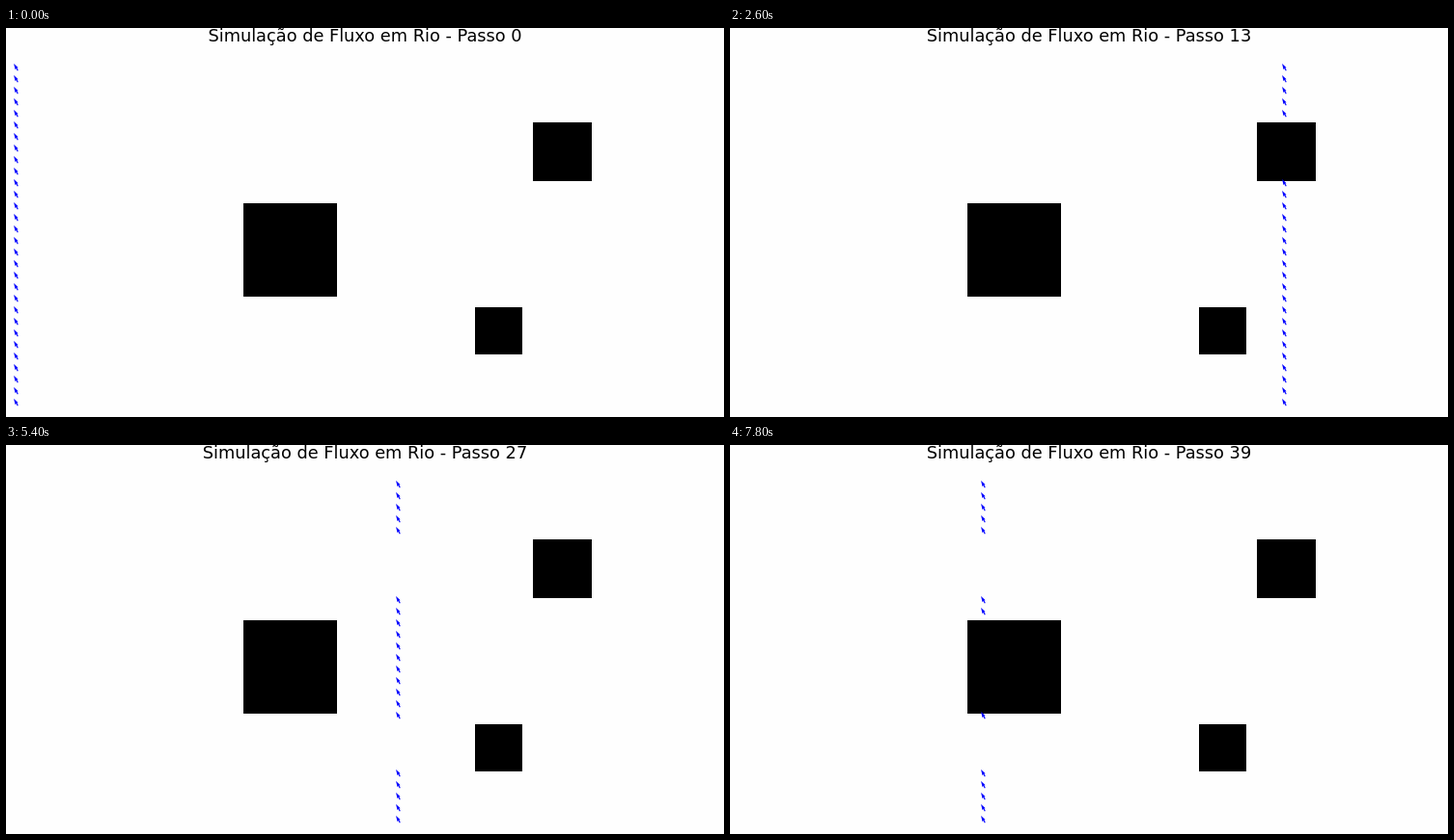
An HTML page with a canvas that plays this animation: 744 by 404 pixels, repeating every 8 s.

```html
<!DOCTYPE html>
<html lang="pt">
<head>
<meta charset="utf-8">
<title>Simulação de Fluxo em Rio</title>
<style>
  html, body { margin: 0; width: 100%; height: 100%; overflow: hidden; background: #fefefe; }
  canvas { display: block; }
</style>
</head>
<body>
<canvas id="stage" width="744" height="404"></canvas>
<script>
const ctx = document.getElementById('stage').getContext('2d');
const STEP_MS = 200, STEPS = 40;
const CELL = 12, COLS = 61, ROWS = 30, TOP = 44;
const blocks = [
  { x: 246, y: 182, size: 97 },
  { x: 546, y: 98, size: 61 },
  { x: 486, y: 290, size: 49 }
];

// Arrow outline along its own axis, tail at the origin
const SHAFT = 1.2, LENGTH = 8.4, ANGLE = Math.atan2(-7.2, -4.2);
const half = [
  [0, SHAFT / 2],
  [LENGTH - 4.5 * SHAFT, SHAFT / 2],
  [LENGTH - 5 * SHAFT, 1.5 * SHAFT]
];
const arrow = new Path2D();
for (const [x, y] of half) arrow.lineTo(x, y);
arrow.lineTo(LENGTH, 0);
for (const [x, y] of [...half].reverse()) arrow.lineTo(x, -y);
arrow.closePath();

function drawArrow(x, y) {
  ctx.save();
  ctx.translate(x + 0.3, y + 0.3);
  ctx.rotate(ANGLE);
  ctx.fill(arrow);
  ctx.restore();
}

// The front wraps to the right edge, then loses the rows that hit a block
function isBlocked(x, y) {
  return blocks.some(b => x < b.x + b.size && y > b.y && y < b.y + b.size);
}

function draw(step) {
  ctx.fillStyle = '#fefefe';
  ctx.fillRect(0, 0, 744, 404);

  ctx.fillStyle = '#000';
  for (const b of blocks) ctx.fillRect(b.x, b.y, b.size, b.size);

  ctx.font = '17.75px "DejaVu Sans", sans-serif';
  ctx.textAlign = 'center';
  ctx.fillText(`Simulação de Fluxo em Rio - Passo ${step}`, 372, 14);

  ctx.fillStyle = '#00f';
  const x = CELL * (step ? COLS - step : 1);
  for (let row = 0; row < ROWS; row++) {
    const y = TOP + row * CELL;
    if (step === 0 || !isBlocked(x, y)) drawArrow(x, y);
  }
}

const start = performance.now();
function tick() {
  const elapsed = Math.max(0, performance.now() - start);
  draw(Math.floor(elapsed / STEP_MS) % STEPS);
  requestAnimationFrame(tick);
}
tick();
</script>
</body>
</html>
```
